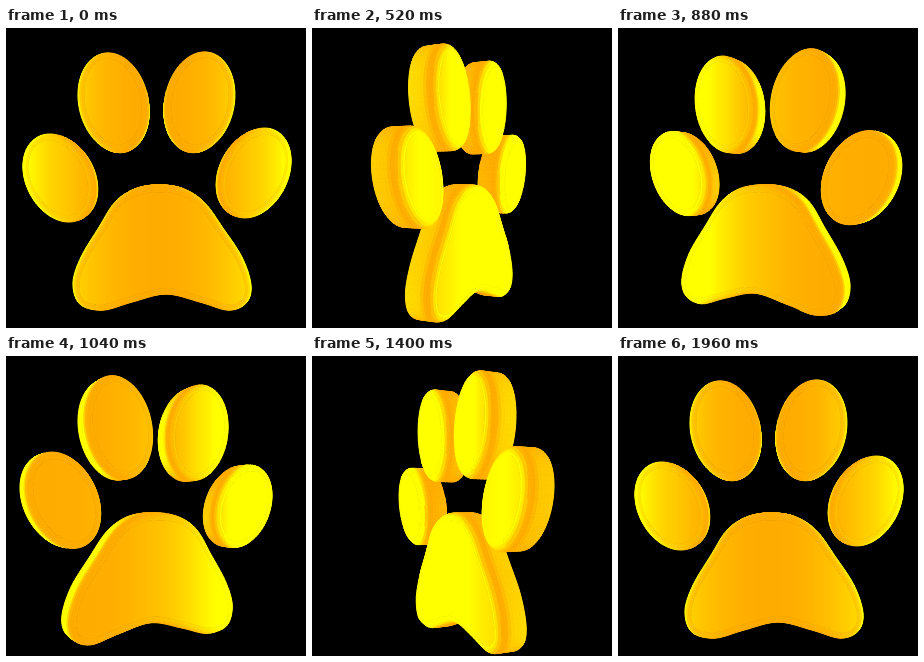
An HTML page with a canvas for the animation above (2 s loop, 300 by 300 pixels).

```html
<!DOCTYPE html>
<html lang="en">
<head>
<meta charset="utf-8">
<title>Turning paw</title>
<style>
  html, body { margin: 0; width: 100%; height: 100%; overflow: hidden; background: #000; }
  canvas { display: block; width: 300px; height: 300px; }
</style>
</head>
<body>
<canvas id="stage" width="300" height="300"></canvas>
<script>
const ctx = document.getElementById('stage').getContext('2d');
const LOOP = 2000, TURN = 1920, STEP = 40;
const DEPTH = 16, BEVEL = 7, CAMERA = 591, FOCAL = CAMERA - DEPTH + BEVEL;
const MID = 150, SLICES = 14;

// Outlines run clockwise, relative to the middle of the stage.
function toe(cx, cy, a, b, degrees) {
  const tilt = degrees * Math.PI / 180, c = Math.cos(tilt), s = Math.sin(tilt);
  return Array.from({ length: 72 }, (_, i) => {
    const u = i / 72 * 2 * Math.PI, x = a * Math.cos(u), y = b * Math.sin(u);
    return [cx - MID + x * c - y * s, cy - MID + x * s + y * c];
  });
}

function smooth(points, parts = 6) {
  const n = points.length, out = [];
  points.forEach((p1, i) => {
    const p0 = points[(i + n - 1) % n], p2 = points[(i + 1) % n], p3 = points[(i + 2) % n];
    for (let k = 0; k < parts; k++) {
      const t = k / parts;
      out.push([0, 1].map(j => 0.5 * (2 * p1[j] + (p2[j] - p0[j]) * t +
        (2 * p0[j] - 5 * p1[j] + 4 * p2[j] - p3[j]) * t * t +
        (3 * p1[j] - p0[j] - 3 * p2[j] + p3[j]) * t * t * t) - MID));
    }
  });
  return out;
}

function withNormals(points) {
  const n = points.length;
  return points.map(([x, y], i) => {
    const a = points[(i + n - 1) % n], b = points[(i + 1) % n];
    const len = Math.hypot(b[0] - a[0], b[1] - a[1]);
    return { x, y, nx: (b[1] - a[1]) / len, ny: (a[0] - b[0]) / len };
  });
}

const parts = [
  toe(53.5, 150, 33.4, 46.4, -27),
  toe(107.5, 74.5, 34.7, 50, -12),
  toe(193.5, 74, 34.7, 50.4, 11),
  toe(248.5, 145, 33.4, 47.3, 26),
  smooth([
    [153, 157], [178, 161], [199, 175], [217, 200], [236, 229], [245, 257], [240, 275],
    [222, 282], [194, 274], [160, 266], [126, 274], [97, 282], [74, 276], [67, 255],
    [75, 229], [93, 199], [109, 174], [129, 161]
  ])
].map(withNormals);

// Side profile: straight wall with rounded rims.
const profile = Array.from({ length: SLICES + 1 }, (_, k) => {
  const z = DEPTH * Math.sin(Math.PI * (k / SLICES - 0.5));
  const over = Math.max(0, Math.abs(z) - DEPTH + BEVEL);
  return { z, inset: BEVEL - Math.sqrt(Math.max(0, BEVEL * BEVEL - over * over)) };
});

const mix = (a, b, k) => a + (b - a) * k;

// Lights stand left and right, behind the parts that swing forward.
function shade(nx, x, z) {
  const side = nx + 0.8 * (x - MID) / 130 * (1 - z / 120);
  return `rgb(255,${Math.round(172 + 83 * Math.min(1, 1.5 * side * side))},0)`;
}

function trace(points) {
  ctx.beginPath();
  points.forEach(p => ctx.lineTo(p.x, p.y));
  ctx.closePath();
}

function area(points) {
  return points.reduce((sum, p, i) => {
    const q = points[(i + 1) % points.length];
    return sum + p.x * q.y - q.x * p.y;
  }, 0);
}

function drawPart(outline, cos, sin) {
  const facing = cos < 0 ? -1 : 1, faceX = sin * facing;
  const rings = profile.map(({ z, inset }) => outline.map(p => {
    const x = p.x - p.nx * inset, y = p.y - p.ny * inset, depth = z * facing;
    const rz = depth * cos - x * sin, k = FOCAL / (CAMERA - rz);
    return { x: MID + (x * cos + depth * sin) * k, y: MID + y * k, z: rz };
  }));

  const quads = [];
  outline.forEach((p, i) => {
    const j = (i + 1) % outline.length;
    const wallX = (p.nx + outline[j].nx) / 2 * cos;
    for (let k = 0; k < SLICES; k++) {
      const corners = [rings[k][i], rings[k][j], rings[k + 1][j], rings[k + 1][i]];
      if (area(corners) * facing <= 0) continue;
      const near = Math.max(0, (profile[k].z + profile[k + 1].z) / 2 / DEPTH);
      const z = (corners[0].z + corners[2].z) / 2, x = (corners[0].x + corners[2].x) / 2;
      quads.push({ corners, z, color: shade(mix(wallX, faceX, near * near), x, z) });
    }
  });
  quads.sort((a, b) => a.z - b.z).forEach(({ corners, color }) => {
    trace(corners);
    ctx.fillStyle = ctx.strokeStyle = color;
    ctx.fill();
    ctx.stroke();
  });

  const face = rings[SLICES];
  if (area(face) * facing <= 0) return;
  const first = face.reduce((a, b) => a.x < b.x ? a : b);
  const last = face.reduce((a, b) => a.x > b.x ? a : b);
  const fill = ctx.createLinearGradient(first.x, 0, last.x, 0);
  for (let i = 0; i <= 12; i++) {
    const t = i / 12, rim = Math.max(0, 1 - Math.min(t, 1 - t) / 0.4);
    const wallX = Math.abs(cos) * (t < 0.5 ? -1 : 1);
    fill.addColorStop(t, shade(mix(faceX, wallX, 0.12 * rim),
      mix(first.x, last.x, t), mix(first.z, last.z, t)));
  }
  trace(face);
  ctx.fillStyle = fill;
  ctx.fill();
}

function draw() {
  const time = Math.floor(performance.now() % LOOP / STEP) * STEP;
  // One full turn with a soft start and stop.
  const angle = Math.PI * (1 - Math.cos(Math.PI * Math.min(1, time / TURN)));
  const cos = Math.cos(angle), sin = Math.sin(angle);
  const depth = outline => -sin * outline.reduce((sum, p) => sum + p.x, 0) / outline.length;
  ctx.fillStyle = '#000';
  ctx.fillRect(0, 0, 300, 300);
  ctx.lineWidth = 1;
  ctx.lineJoin = 'round';
  [...parts].sort((a, b) => depth(a) - depth(b)).forEach(p => drawPart(p, cos, sin));
  requestAnimationFrame(draw);
}
draw();
</script>
</body>
</html>
```
